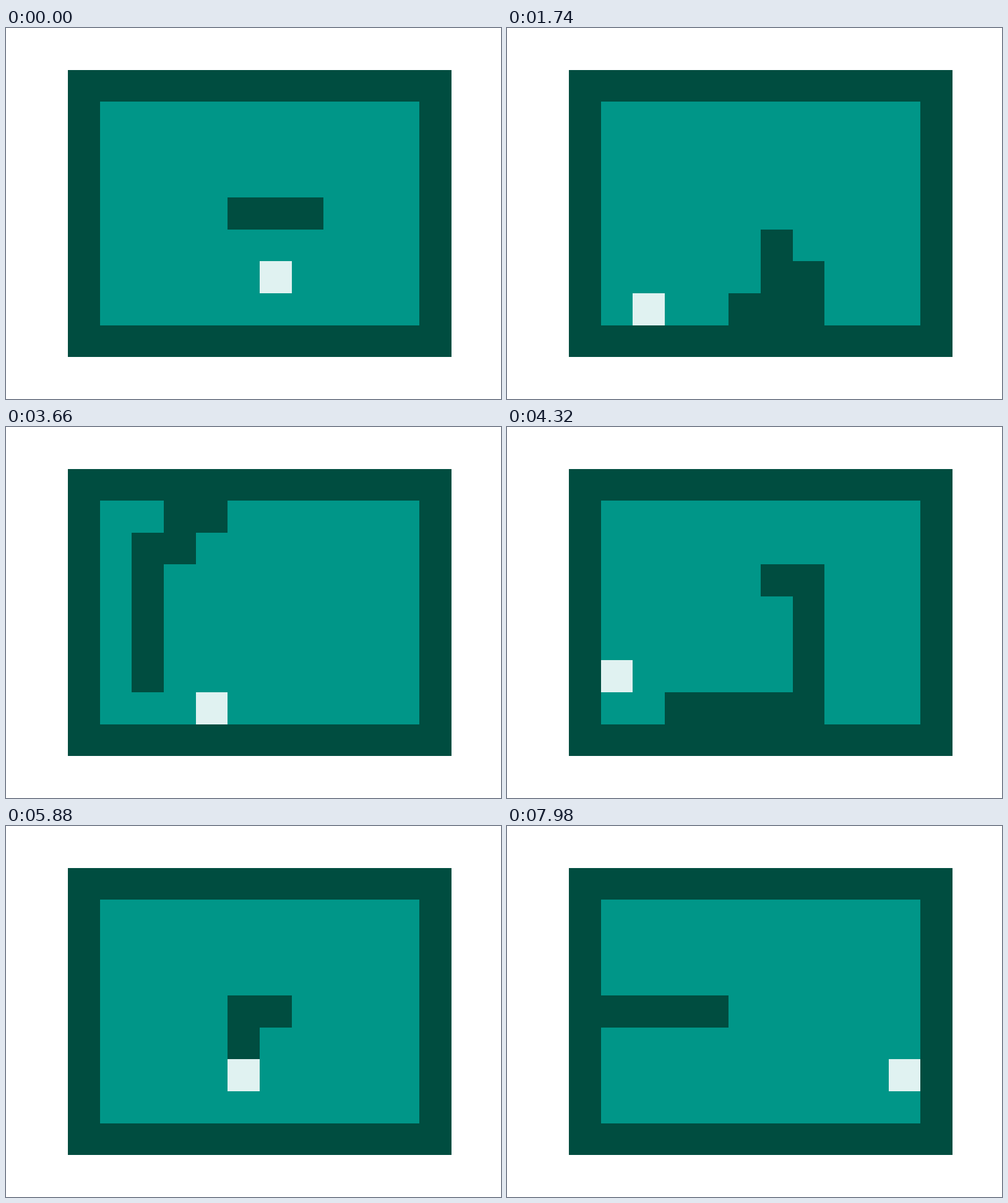
Recreate the animation shown at these times as an HTML page with a canvas. Size 800 by 600 pixels, loop 8000 ms.

```html
<!DOCTYPE html>
<html lang="en">
<head>
<meta charset="utf-8">
<title>Snake</title>
<style>
  html, body { margin: 0; width: 100%; height: 100%; overflow: hidden; background: #fff; }
  canvas { display: block; }
</style>
</head>
<body>
<canvas id="stage" width="800" height="600"></canvas>
<script>
const STEP = 60, LOOP = 8000;
const DARK = '#004d40', FIELD = '#009688', FOOD = '#e0f2f1';
const ctx = document.getElementById('stage').getContext('2d');

const DIRECTIONS = { U: [0, -1], D: [0, 1], L: [-1, 0], R: [1, 0] };
const START = [[5, 4], [6, 4], [7, 4]];

// Each life is a route of direction + distance; a crash restarts the snake.
const LIVES = [
  'D2 R1 D1 L5 U6 R5 D5 R1 D1 L5 U1 R2 U4 L1 U1 L2 D4 R3 U4 L1 D1 L1 ' +
  'D5 R5 U4 L1 D4 L3 U3 L1 D2 L1 U5 R5',
  'D2 R1 U3 R2 D1 L6 D2 L1 D1 R9 U3',
  'L4'
];
const MEALS = [[6, 6], [1, 1], [7, 7], [2, 7], [4, 1], [4, 7], [7, 3], [1, 6],
               [6, 1], [5, 6], [8, 3], [1, 6], [10, 7], [1, 4], [10, 6]];

function playGame() {
  const states = [];
  let meal = 0;
  for (const route of LIVES) {
    let snake = START;
    const record = () => states.push({ snake, food: MEALS[meal] });
    record();
    for (const run of route.split(' ')) {
      const [dx, dy] = DIRECTIONS[run[0]];
      for (let i = 0; i < Number(run.slice(1)); i++) {
        const [x, y] = snake[0];
        const head = [x + dx, y + dy];
        const eats = head.join() === MEALS[meal].join();
        snake = [head, ...(eats ? snake : snake.slice(0, -1))];
        if (eats) meal++;
        record();
      }
    }
  }
  return states;
}

const edgeX = column => Math.round(100 + column * 620 / 12);
const edgeY = row => Math.round(67.6 + row * 51.63);

function fillCells(color, column, row, columns = 1, rows = 1) {
  const x = edgeX(column), y = edgeY(row);
  ctx.fillStyle = color;
  ctx.fillRect(x, y, edgeX(column + columns) - x, edgeY(row + rows) - y);
}

const states = playGame();

function draw() {
  const step = Math.floor(performance.now() % LOOP / STEP);
  const { snake, food } = states[step];
  fillCells(DARK, 0, 0, 12, 9);
  fillCells(FIELD, 1, 1, 10, 7);
  fillCells(FOOD, ...food);
  for (const cell of snake) fillCells(DARK, ...cell);
  requestAnimationFrame(draw);
}
draw();
</script>
</body>
</html>
```
